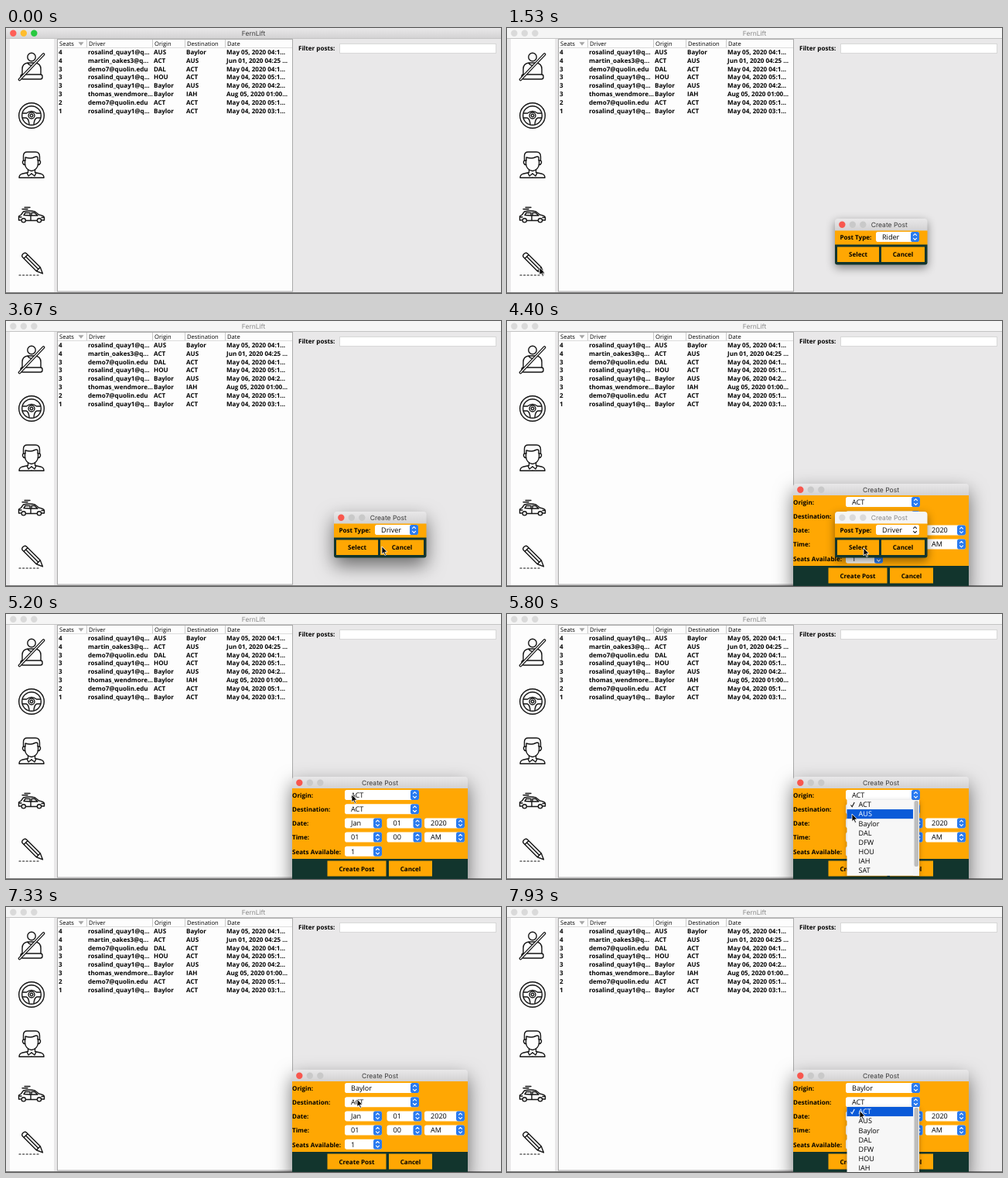
Animation of 640 by 342 pixels, one loop 8000 ms. Source, as an HTML page:

```html
<!DOCTYPE html>
<html lang="en">
<head>
<meta charset="utf-8">
<title>FernLift</title>
<style>
  html, body { margin: 0; width: 100%; height: 100%; overflow: hidden; background: #e9e8e9; }
  svg { display: block; width: 640px; height: 342px; }
  text { text-rendering: geometricPrecision; fill: #000; }
  .bold { font: 700 8.05px "Open Sans", "Noto Sans", sans-serif; }
  .head { font: 400 7.6px "Open Sans", "Noto Sans", sans-serif; }
  .item { font: 500 9.1px "Open Sans", "Noto Sans", sans-serif; }
  .title { font: 400 8.5px Inter, Roboto, sans-serif; fill: #3c3c3c; }
  .mid { text-anchor: middle; }
  .dim .title { fill: #8a8a8a; }
  .dim .bar { fill: #f5f5f5; }
  .dim .light { fill: #dadada; }
  .dim .arrowBox { fill: #fff; }
  .dim .arrows { stroke: #222; }
  .arrows { fill: none; stroke: #fff; stroke-width: 1.1; stroke-linecap: round; stroke-linejoin: round; }
  .icon { fill: none; stroke: #151515; stroke-width: 1.4; stroke-linecap: round; stroke-linejoin: round; }
  .window { filter: drop-shadow(0 10px 12px rgba(0, 0, 0, .55)); }
  .window.dim, .window.opening { filter: drop-shadow(0 4px 6px rgba(0, 0, 0, .45)); }
  .popup { filter: drop-shadow(0 2px 3px rgba(0, 0, 0, .3)); }
</style>
</head>
<body>
<svg id="stage" viewBox="0 0 640 342"></svg>
<script>
const LOOP = 8000, TICK = 1000 / 15, ROW = 12.1;
const ORANGE = '#ffa703', GREEN = '#12352d', GRAY = '#c9c9c9', WHITE = '#fdfdfd';
const AIRPORTS = ['ACT', 'AUS', 'Baylor', 'DAL', 'DFW', 'HOU', 'IAH', 'SAT'];

const rect = (x, y, w, h, fill, extra = '') =>
  `<rect x="${x}" y="${y}" width="${w}" height="${h}" fill="${fill}" ${extra}/>`;
const text = (x, y, s, cls, extra = '') => `<text x="${x}" y="${y}" class="${cls}" ${extra}>${s}</text>`;
const path = (d, extra = '') => `<path d="${d}" ${extra}/>`;
const circle = (x, y, r, extra = '') => `<circle cx="${x}" cy="${y}" r="${r}" ${extra}/>`;
const mirrored = (shape, axis) => shape + `<g transform="translate(${axis * 2} 0) scale(-1 1)">${shape}</g>`;

const lights = (x, y, colors) => colors.map((c, i) =>
  circle(x + i * 13.5, y, 4.2, `fill="${c}" class="light"`)).join('');

function combo(x, y, w, value, id = '') {
  const ax = x + w - 5.5, ay = y + 6.5;
  return rect(x, y, w, 13, '#fff', 'rx="2.8"') +
    rect(x + w - 11, y, 11, 13, '#2a7bf0', 'rx="2.8" class="arrowBox"') +
    path(`M${ax - 2} ${ay - 1.8}l2-2 2 2M${ax - 2} ${ay + 1.8}l2 2 2-2`, 'class="arrows"') +
    text(x + 8, y + 9.8, value, 'item', id && `id="${id}"`);
}

const button = (x, y, w, h, label) =>
  rect(x, y, w, h, ORANGE) + text(x + w / 2, y + h / 2 + 3, label, 'bold mid');

function popup(id, x, y, w, items, scrolls) {
  const h = items.length * ROW + 1;
  const rows = items.map((s, i) => text(x + 15, y + i * ROW + 9.3, s, 'item row')).join('');
  const bar = scrolls
    ? rect(x + w - 8, y, 8, h, '#f4f4f4') + rect(x + w - 6.5, y + 1, 5.5, 85, '#bdbdbd', 'rx="2.5"') : '';
  return `<g id="${id}" class="popup">${rect(x, y, w, h, '#f7f7f7')}
    ${rect(x, y, scrolls ? w - 8 : w, ROW, '#0a5ad8', 'class="hover"')}${rows}
    ${path(`M${x + 5} ${y + 6.5}l1.7 2.3 3-5.8`, 'class="check" fill="none" stroke="#111" stroke-width="1.1"')}${bar}</g>`;
}

function icons() {
  const slash = 'M17.5 66.5L48.5 34';
  const belt = circle(33, 37.5, 5.2) +
    path('M21 60V53q0-7 7-8h10q7 1 7 8v7M28 45.500q5 6 10 0') + rect(19, 60, 28, 6, WHITE, 'rx="2.5"') +
    path(slash, 'stroke-width="3.8"') + path(slash, `stroke="${WHITE}" stroke-width="1.2"`);
  const wheel = circle(33, 113, 16.3) + circle(33, 113, 12.3) + circle(33, 113, 4) + circle(33, 113, 1.8) +
    path('M21.500 110h5q6.500-5 13 0h5') +
    mirrored(path('M21.500 116h4.500q3.500 1 4 8.500'), 33);
  const person = path('M22.500 171v-6q0-5 5-5h10.500q5.500 0 5.500 6v5M25 171v-4q7 2 11 0 4-2 5 0v4') +
    path('M24.500 171v5q1 7 8.500 8.500 7.500-1.500 8.500-8.500v-5') +
    mirrored(path('M24.500 171q-3.500-.5-3 3 1 3 3.300 2.500M28.500 183v3.500l-8 1.800q-3.500 1-3.500 5h16M27 187l2 4 4-3'), 33);
  const car = path('M19 248h-2.500v-5l3-2 3-4q8-2 15 0l5 4q6 1 7 3.500v3.500h-3M26 248.500h14') +
    path('M23 241.500l2-3h6v3.500zM33 238.500h4l4 3.500h-8zM32 242v6M17 244h3M46 244.500h3') +
    circle(22.7, 248.3, 2.6) + circle(43, 248.3, 2.6) + path('M24 231.500h7M21 233.700h7');
  const pencil = '<g transform="translate(22 291.5) rotate(45)">' +
    path('M3-3.500H28L36 0 28 3.500H3Q0 3.500 0 0T3-3.500zM5-3.500v7M5 0H28M28-3.500v7') + '</g>' +
    path('M17 319h25', 'stroke-dasharray="2 2.600" stroke-width="1.200"');
  return `<g class="icon">${belt}${wheel}${person}${car}${pencil}</g>`;
}

function table() {
  const cols = [68, 106, 191, 233, 285];
  const rider = 'rosalind_quay1@q...', demo = 'demo7@quolin.edu';
  const rows = [
    [4, rider, 'AUS', 'Baylor', 'May 05, 2020 04:1...'],
    [4, 'martin_oakes3@q...', 'ACT', 'AUS', 'Jun 01, 2020 04:25 ...'],
    [3, demo, 'DAL', 'ACT', 'May 04, 2020 04:1...'],
    [3, rider, 'HOU', 'ACT', 'May 04, 2020 05:1...'],
    [3, rider, 'Baylor', 'AUS', 'May 06, 2020 04:2...'],
    [3, 'thomas_wendmore...', 'Baylor', 'IAH', 'Aug 05, 2020 01:00...'],
    [2, demo, 'ACT', 'ACT', 'May 04, 2020 05:1...'],
    [1, rider, 'Baylor', 'ACT', 'May 04, 2020 03:1...'],
  ];
  const heads = ['Seats', 'Driver', 'Origin', 'Destination', 'Date'];
  return rect(66.5, 14.5, 304, 325.5, WHITE, 'stroke="#a9a9a9"') +
    path('M67 25.500H370', 'stroke="#ddd"') +
    [104.5, 189.5, 231.5, 283.5].map(x => path(`M${x} 15v10`, `stroke="${GRAY}"`)).join('') +
    path('M93.500 18.300h7l-3.500 4.500z', 'fill="#a5a5a5"') +
    heads.map((s, i) => text(cols[i] + 1, 23, s, 'head')).join('') +
    rows.map((r, j) => r.map((s, i) => text(cols[i], 34 + j * 10.8, s, 'bold')).join('')).join('');
}

function mainWindow() {
  return `<g id="main">${rect(0, 0, 640, 342, '#e9e8e9')}
    ${rect(0, 0, 640, 14, 'url(#titleBar)', 'class="bar"')}${path('M0 13.500H640', 'stroke="#c4c4c4"')}
    ${lights(9.3, 6.8, ['#ff5f57', '#ffbd2e', '#28c940'])}${text(320, 10, 'FernLift', 'title mid')}
    ${rect(5, 14, 57, 327, WHITE)}${icons()}${table()}
    ${text(378, 29, 'Filter posts:', 'bold')}${rect(431.5, 20.5, 202, 12, '#fff', 'stroke="#d8d8d8"')}
    ${path('M0 341.500H640', 'stroke="#777"')}</g>`;
}

function frameTop(x, y, w, h, title) {
  return path(`M${x} ${y + h}V${y + 4}q0-4 4-4h${w - 8}q4 0 4 4v${h - 4}z`, 'fill="url(#titleBar)" class="bar"') +
    lights(x + 9.3, y + 7.8, ['#f8574e', GRAY, GRAY]) +
    text(x + w / 2 + (w < 150 ? 10.5 : 0), y + 11, title, 'title mid');
}

function typeDialog() {
  return `<g id="typeDialog" class="window">${frameTop(424, 246, 119.5, 16, 'Create Post')}
    ${rect(424, 261.5, 119.5, 18.5, ORANGE)}
    ${path('M424 279.500h119.500v23q0 3-3 3h-113.500q-3 0-3-3z', `fill="${GREEN}"`)}
    ${text(430.5, 273, 'Post Type:', 'bold')}${combo(477, 263, 56, 'Rider', 'postType')}
    ${button(427, 282.5, 54, 19.5, 'Select')}${button(484, 282.5, 56, 19.5, 'Cancel')}</g>`;
}

function postDialog() {
  const labels = ['Origin:', 'Destination:', 'Date:', 'Time:', 'Seats Available:'];
  const y = i => 227 + i * 18.2;
  return `<g id="postDialog" class="window">${frameTop(370, 210, 227, 15, 'Create Post')}
    ${rect(370, 225, 227, 91, ORANGE)}${rect(370, 316, 227, 30, GREEN)}
    ${labels.map((s, i) => text(370, y(i) + 9.8, s, 'bold')).join('')}
    ${combo(438, y(0), 96, 'ACT', 'origin')}${combo(438, y(1), 96, 'ACT')}
    ${[['Jan', '01', '2020'], ['01', '00', 'AM']].map((r, i) =>
      combo(438, y(i + 2), 48, r[0]) + combo(492.5, y(i + 2), 45, r[1]) + combo(541, y(i + 2), 52, r[2])).join('')}
    ${combo(438, y(4), 48, '1')}
    ${button(415.5, 318.5, 76, 20, 'Create Post')}${button(495, 318.5, 56, 20, 'Cancel')}</g>`;
}

const stage = document.getElementById('stage');
stage.innerHTML = `<defs><linearGradient id="titleBar" x2="0" y2="1">
    <stop stop-color="#e9e8e9"/><stop offset="1" stop-color="#d2d1d2"/></linearGradient></defs>
  ${mainWindow()}${postDialog()}${typeDialog()}
  ${popup('typeList', 478, 276, 54, ['Rider', 'Driver'])}
  ${popup('originList', 439.5, 240, 93.5, AIRPORTS, true)}
  ${popup('destList', 439.5, 258, 93.5, AIRPORTS, true)}
  ${path('M0 0V9.800L2.300 7.700 3.900 11.400 5.500 10.700 3.900 7.100H7z',
    'id="cursor" fill="#000" stroke="#fff" stroke-width=".8"')}`;
const el = Object.fromEntries([...stage.querySelectorAll('[id]')].map(e => [e.id, e]));

// Pointer stops: time, x, y
const STOPS = [
  [800, 288, 348], [1267, 42, 309], [1733, 42, 309], [2533, 484, 268], [2800, 484, 268],
  [3467, 486, 291], [3667, 486, 291], [4200, 461, 293], [4733, 461, 293], [5200, 447, 233],
  [5400, 447, 234], [5800, 446, 258], [6200, 447, 262.5], [6533, 450, 270], [6800, 450, 270],
  [7333, 454, 248], [7667, 454, 249], [7933, 456, 263],
];

function pointer(t) {
  const i = STOPS.findIndex(s => s[0] > t);
  if (i === 0) return [-30, -30];
  if (i < 0) return STOPS[STOPS.length - 1].slice(1);
  const [t0, x0, y0] = STOPS[i - 1], [t1, x1, y1] = STOPS[i];
  const u = (t - t0) / (t1 - t0), k = u * u * (3 - 2 * u);
  return [x0 + (x1 - x0) * k, y0 + (y1 - y0) * k];
}

const show = (node, on) => { node.style.display = on ? '' : 'none'; };

function updateList(list, on, top, y) {
  show(list, on);
  if (!on) return;
  const rows = list.querySelectorAll('.row');
  const hit = Math.max(0, Math.min(rows.length - 1, Math.floor((y - top) / ROW)));
  list.querySelector('.hover').setAttribute('y', top + hit * ROW);
  rows.forEach((r, i) => { r.style.fill = i === hit ? '#fff' : '#000'; });
  list.querySelector('.check').setAttribute('stroke', hit ? '#111' : '#fff');
}

function render(now) {
  const t = Math.floor((now % LOOP + 4) / TICK) * TICK + 1;
  const between = (a, b) => t >= a && t < b;
  const [x, y] = pointer(t);
  el.cursor.setAttribute('transform', `translate(${x} ${y})`);
  el.main.classList.toggle('dim', t >= 1530);
  show(el.typeDialog, between(1530, 4466));
  el.typeDialog.classList.toggle('opening', t < 1600);
  el.typeDialog.classList.toggle('dim', t >= 4333);
  show(el.postDialog, t >= 4333);
  el.postType.textContent = t < 3666 ? 'Rider' : 'Driver';
  el.origin.textContent = t < 6800 ? 'ACT' : 'Baylor';
  updateList(el.typeList, between(2733, 3666), 276, y);
  updateList(el.originList, between(5400, 6800), 240, y);
  updateList(el.destList, t >= 7666, 258, y);
}

const start = performance.now();
function tick() {
  render(performance.now() - start);
  requestAnimationFrame(tick);
}
tick();
</script>
</body>
</html>
```
